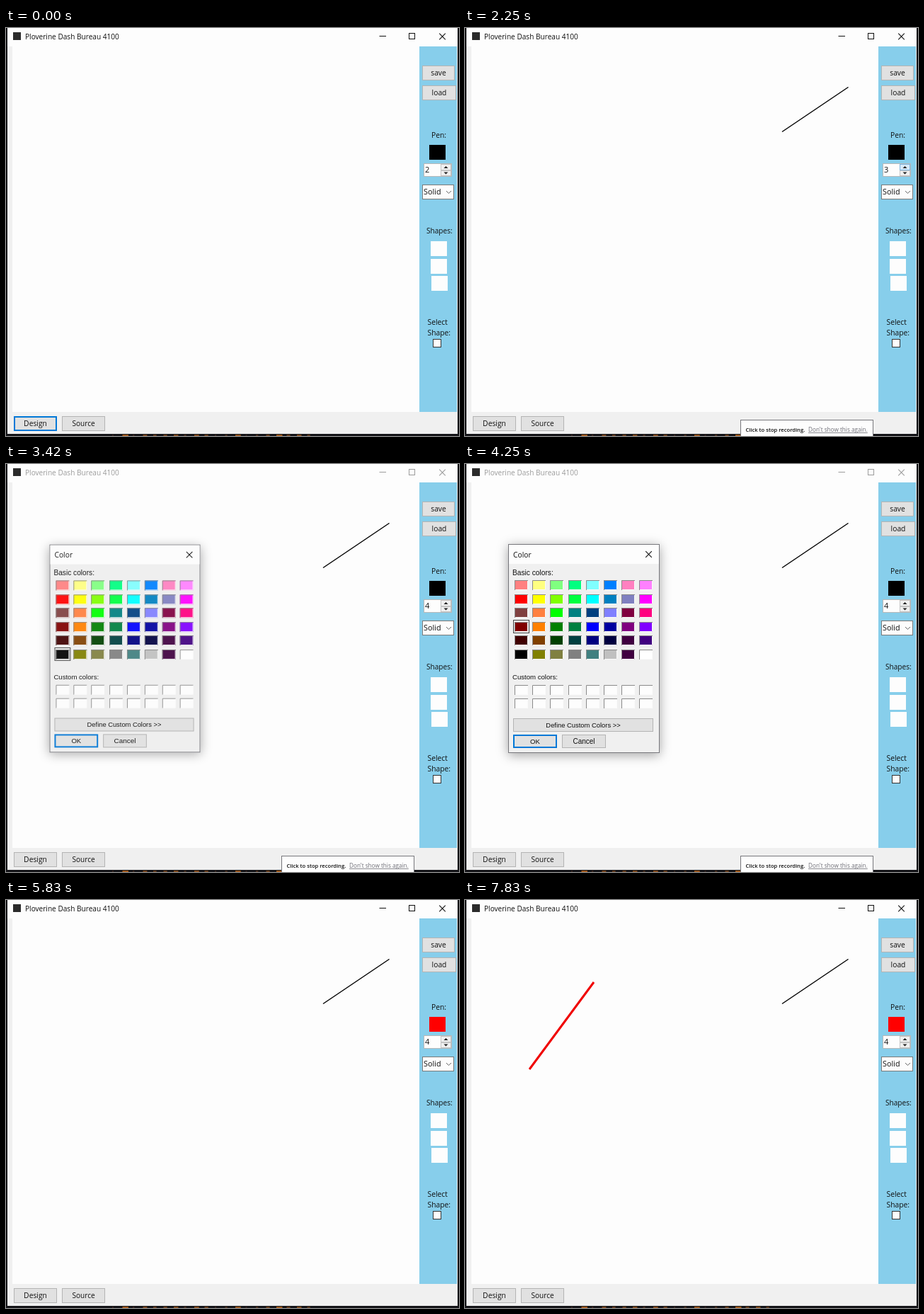
An HTML page with a canvas that plays this animation: 640x576 px, repeating every 8 s.

```html
<!DOCTYPE html>
<html lang="en">
<head>
<meta charset="utf-8">
<title>Drawing window</title>
<style>
  html, body { margin: 0; width: 100%; height: 100%; overflow: hidden; background: #fdfdfd; }
  canvas { display: block; width: 640px; height: 576px; }
</style>
</head>
<body>
<canvas id="stage" width="640" height="576"></canvas>
<script>
const ctx = document.getElementById('stage').getContext('2d');
const LOOP = 8000;
const UI = '"Open Sans", "Noto Sans", sans-serif';
const DIALOG = '"Liberation Sans", Arial, sans-serif';
const C = {
  paper: '#fdfdfd', form: '#f0f0f0', side: '#87ceeb', button: '#e1e1e1',
  edge: '#b4b4b4', ink: '#101010', muted: '#9c9c9c', focus: '#0078d7',
  hover: '#d8eaf9', dark: '#141418'
};
const SWATCHES = [
  'ff8080 ffff80 80ff80 00ff80 80ffff 0080ff ff80c0 ff80ff',
  'ff0000 ffff00 80ff00 00ff40 00ffff 0080c0 8080c0 ff00ff',
  '804040 ff8040 00ff00 008080 004080 8080ff 800040 ff0080',
  '800000 ff8000 008000 008040 0000ff 0000a0 800080 8000ff',
  '400000 804000 004000 004040 000080 000040 400040 400080',
  '000000 808000 808040 808080 408080 c0c0c0 400040 ffffff'
].map(row => row.split(' '));

const during = (t, from, to) => t >= from && t < to;
const ramp = (t, from, to) => Math.min(1, Math.max(0, (t - from) / (to - from)));
const smooth = p => p * p * (3 - 2 * p);
const easeOut = p => 1 - (1 - p) ** 3;

function box(x, y, w, h, fill, edge, weight = 1) {
  ctx.fillStyle = fill;
  ctx.fillRect(x, y, w, h);
  if (!edge) return;
  ctx.strokeStyle = edge;
  ctx.lineWidth = weight;
  ctx.strokeRect(x + weight / 2, y + weight / 2, w - weight, h - weight);
}

function path(points, color, width = 1) {
  ctx.strokeStyle = color;
  ctx.lineWidth = width;
  ctx.beginPath();
  points.forEach(([x, y], i) => i ? ctx.lineTo(x, y) : ctx.moveTo(x, y));
  ctx.stroke();
}

// y is the middle of the capital letters
function text(str, x, y, { size = 10.3, color = C.ink, family = UI, align = 'left', weight = 400 } = {}) {
  ctx.font = `${weight} ${size}px ${family}`;
  ctx.fillStyle = color;
  ctx.textAlign = align;
  ctx.fillText(str, x, y + size * 0.36);
  return ctx.measureText(str).width;
}

function button(label, x, y, w, h, { focused = false, ...font } = {}) {
  box(x, y, w, h, C.button, focused ? C.focus : C.edge, focused ? 2 : 1);
  text(label, x + w / 2, y + h / 2, { align: 'center', ...font });
}

function spinButton(y, h, dir, hover) {
  box(614, y, 15, h, hover ? C.hover : C.form, hover ? '#7fb4de' : '#c4c4c4');
  const mid = y + h / 2;
  ctx.fillStyle = '#222';
  ctx.beginPath();
  ctx.moveTo(618.5, mid + 1.5 * dir);
  ctx.lineTo(624.5, mid + 1.5 * dir);
  ctx.lineTo(621.5, mid - 1.5 * dir);
  ctx.fill();
}

function cross(x, y, r, color) {
  path([[x - r, y - r], [x + r, y + r]], color, 1.1);
  path([[x - r, y + r], [x + r, y - r]], color, 1.1);
}

function drawFrame(active) {
  const color = active ? C.ink : C.muted;
  box(0, 0, 640, 576, C.dark);
  box(2, 0, 636, 573, C.form);
  box(2, 0, 636, 26, C.paper);
  box(9, 26, 575, 516, C.paper);
  box(584, 26, 53, 516, C.side);
  for (let i = 0; i < 20; i++) {
    const s = Math.abs(Math.sin(i * 12.9898) * 43758.5453) % 1;
    box(150 + i * 14.5, 574, 2 + s * 7, 2, `rgb(${50 + s * 120}, ${35 + s * 60}, 30)`);
  }
  box(10, 6, 11, 11, '#2b2b2b');
  text('Ploverine Dash Bureau 4100', 27, 12, { size: 10.1, color });
  path([[527.5, 11.5], [537, 11.5]], color);
  ctx.strokeRect(569.5, 7.5, 8, 8);
  cross(616.5, 12, 4.3, color);
}

function drawSide(t) {
  button('save', 588, 53, 46, 21);
  button('load', 588, 81, 48, 21);

  text('Pen:', 601, 151);
  box(598, 165, 23, 21, t < 5670 ? '#000' : '#f00');

  const value = t < 2000 ? 2 : t < 2670 ? 3 : 4;
  box(590, 191, 40, 19, C.paper, '#b8b8b8');
  text(value, 592, 200.5, { size: 11 });
  spinButton(192, 9, 1, during(t, 1250, 1420) || during(t, 2000, 2830));
  spinButton(201, 8, -1, during(t, 1420, 1670));
  if (during(t, 5920, 6420) || during(t, 6920, 7420)) box(592, 193, 1, 14, '#111');

  box(588, 221, 45, 21, C.paper, '#7a7a7a');
  text('Solid', 590, 231.5, { size: 10.8 });
  path([[622, 230], [625.5, 233.5], [629, 230]], '#666');

  text('Shapes:', 594, 286, { size: 10.1 });
  [[600, 301], [600, 326], [601, 350]].forEach(([x, y]) => box(x, y, 23, 21, C.paper));

  text('Select', 595.5, 415.5);
  text('Shape:', 595.5, 430.5);
  box(603, 439, 12, 12, C.paper, '#333');
}

function drag(from, to, p, color, width) {
  if (p <= 0) return;
  const end = from.map((v, i) => v + (to[i] - v) * p);
  path([from, end], color, width);
}

function sunken(x, y, fill) {
  box(x, y, 19, 14, fill);
  path([[x + 0.5, y + 14], [x + 0.5, y + 0.5], [x + 19, y + 0.5]], '#8a8a8a');
  path([[x + 18.5, y + 1], [x + 18.5, y + 13.5], [x + 1, y + 13.5]], '#fafafa');
}

function drawDialog(t) {
  const shown = easeOut(ramp(t, 3180, 3600)) * (1 - smooth(ramp(t, 5560, 5800)));
  if (!shown) return;
  const scale = 0.94 + 0.06 * shown;
  ctx.save();
  ctx.globalAlpha = shown;
  ctx.translate(168, 260.5);
  ctx.scale(scale, scale);
  ctx.translate(-168, -260.5);

  ctx.save();
  ctx.shadowColor = 'rgba(0, 0, 0, 0.36)';
  ctx.shadowBlur = 15;
  ctx.shadowOffsetY = 3;
  box(61, 113, 214, 295, C.form);
  ctx.restore();
  box(61, 113, 214, 295, C.form, '#77777c');
  box(62, 114, 212, 27, C.paper);
  text('Color', 68, 128);
  cross(259.5, 127.5, 4.3, C.ink);

  const font = { family: DIALOG, size: 9.6 };
  text('Basic colors:', 67, 153, { ...font, size: 10.2 });
  text('Custom colors:', 67, 301, font);
  const colX = i => Math.round(70 + i * 25.2);
  const rowY = j => Math.round(164 + j * 19.5);
  const picked = t < 4250 ? 5 : t < 5000 ? 3 : 1;
  box(68, rowY(picked) - 3, 23, 19, C.form, '#444');
  SWATCHES.forEach((row, j) => row.forEach((c, i) => sunken(colX(i), rowY(j), '#' + c)));
  for (let i = 0; i < 8; i++) {
    sunken(colX(i), 312, C.paper);
    sunken(colX(i), 331, C.paper);
  }

  button('Define Custom Colors >>', 68, 359, 198, 19, { ...font, size: 9.4 });
  button('OK', 68, 382, 62, 19, { ...font, focused: true });
  button('Cancel', 137, 382, 62, 19, { ...font, size: 10 });
  ctx.restore();
}

function drawNotice(t) {
  if (!during(t, 1250, 5330)) return;
  ctx.save();
  ctx.globalAlpha = 1 - ramp(t, 5080, 5330);
  box(389, 553, 188, 24, C.paper, '#77777c');
  text('Click to stop recording.', 396.5, 567, { size: 7.6, weight: 600 });
  const w = text("Don't show this again.", 485, 567, { size: 8.2, color: '#707078' });
  path([[485, 571.5], [485 + w, 571.5]], '#707078', 0.8);
  ctx.restore();
}

function render(t) {
  drawFrame(!during(t, 3170, 5670));
  drawSide(t);
  button('Design', 11, 548, 61, 21, { focused: t < 2000 });
  button('Source', 79, 548, 61, 21, { size: 10.1 });
  drag([448, 146.5], [541.5, 83.5], smooth(ramp(t, 0, 830)), '#000', 1.5);
  drag([91, 239], [182, 116], smooth(ramp(t, 7090, 7830)), '#f00000', 3);
  drawDialog(t);
  drawNotice(t);
}

const start = performance.now();
function tick() {
  render((performance.now() - start) % LOOP);
  requestAnimationFrame(tick);
}
tick();
</script>
</body>
</html>
```
